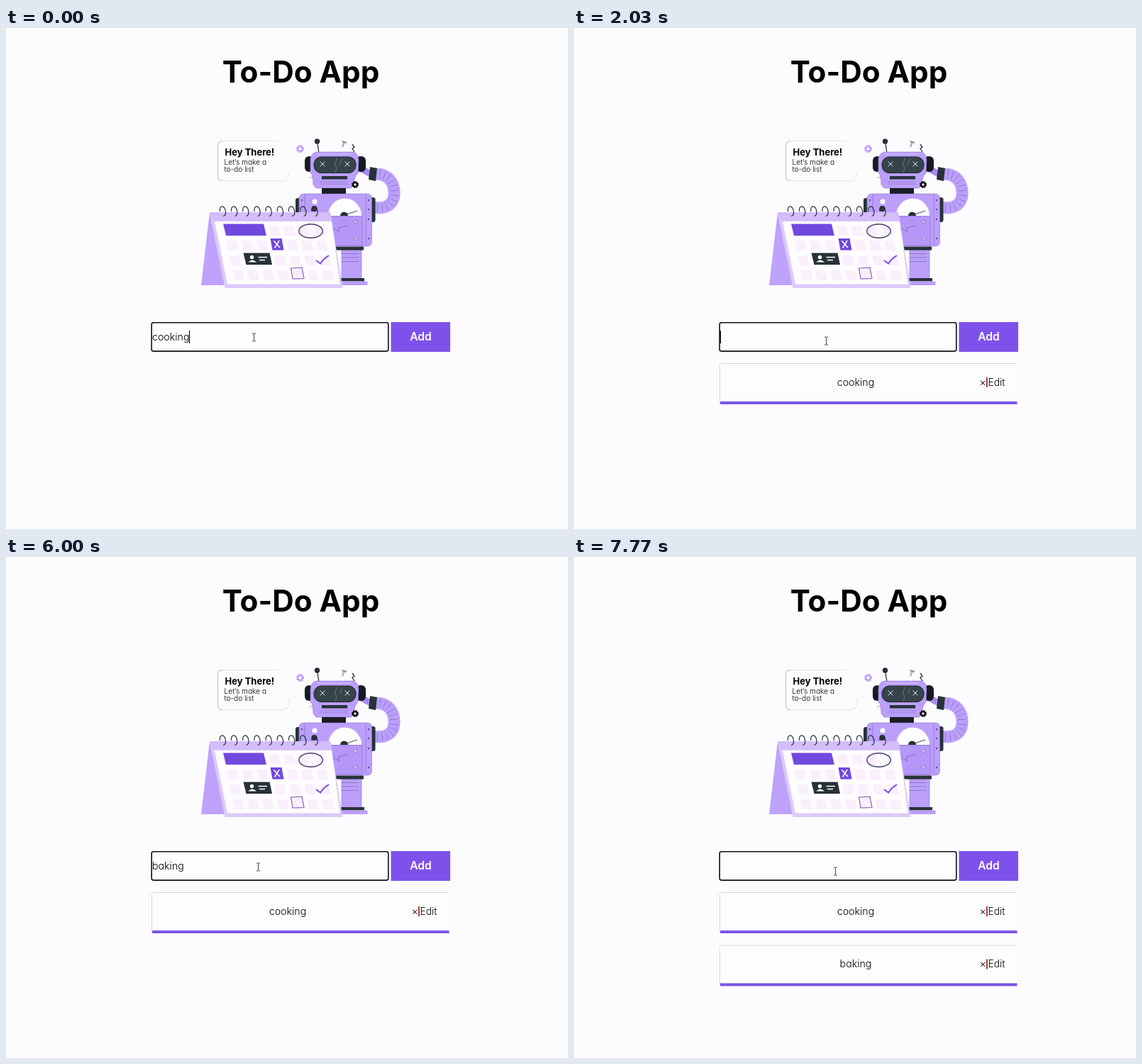
Write an HTML page that moves like this. It is 792 px wide and 707 px high and loops after 8000 ms.

```html
<!DOCTYPE html>
<html lang="en">
<head>
<meta charset="utf-8">
<title>To-Do App</title>
<style>
  html, body { margin: 0; width: 792px; height: 707px; overflow: hidden; background: #fcfcff; }
  svg { display: block; }
  text { font-family: Inter, "Open Sans", sans-serif; font-size: 14.2px; font-weight: 300; font-feature-settings: "cv11"; white-space: pre; }
  .bold { font-weight: 700; }
  .mid { text-anchor: middle; }
  .line { fill: none; stroke: #263238; }
  .lilac { fill: #bb9ffb; stroke: #8d74c9; stroke-width: .6; }
  .dark { fill: #263238; }
  .violet { fill: #7049de; }
</style>
</head>
<body>
<svg width="792" height="707" viewBox="0 0 792 707">
  <defs>
    <g id="item">
      <rect x="206" y="473" width="418" height="55" fill="#fdfdff"/>
      <path d="M205.500 528V476Q205.500 473.500 208 473.500H623" fill="none" stroke="#dcdcd2"/>
      <rect x="206" y="527" width="418.500" height="4" fill="#7a55e6"/>
      <text x="571.500" y="504.500">×</text>
      <rect x="581" y="493" width="1.800" height="14" fill="#a32a22"/>
      <text x="583.500" y="504.500" style="font-size:13.800px">Edit</text>
    </g>
    <path id="tube" d="M520 206C539 205 548 219 547 235C546 250 534 256 518 253"/>
  </defs>

  <text class="bold mid" x="415.500" y="76.500" style="font-size:42.200px">To-Do App</text>

  <!-- speech bubble -->
  <g fill="none" stroke="#e4e4e9">
    <path d="M384 159.500H305Q298.500 159.500 298.500 166V209Q298.500 215.500 305 215.500H391Q398 215.500 398 208V203"/>
    <path d="M398 203Q401 196.500 413 196" stroke="#efeff3"/>
    <path d="M305 159.500Q298.500 159.500 298.500 166V209Q298.500 215.500 305 215.500" stroke="#bdbdc2"/>
  </g>
  <text class="bold" x="308.500" y="180" style="font-size:13px">Hey There!</text>
  <text x="307.500" y="192.500" style="font-size:10.200px">Let’s make a</text>
  <text x="307.500" y="203" style="font-size:10.200px">to-do list</text>
  <g fill="none" stroke="#b999fa">
    <circle cx="414.500" cy="170.500" r="3.200" stroke-width="2"/>
    <circle cx="414.500" cy="170.500" r="4.800" stroke-width="1.800" stroke-dasharray="2 1.770"/>
  </g>

  <!-- robot: arm -->
  <path d="M501 199L514 206" stroke="#a98af0" stroke-width="9"/>
  <use href="#tube" fill="none" stroke="#bb9ffb" stroke-width="17"/>
  <use href="#tube" fill="none" stroke="#7c66b4" stroke-width="12" stroke-dasharray=".6 6"/>
  <path class="dark" d="M513 196L523 198L521 216L511 214Z"/>

  <!-- robot: head -->
  <path class="line" d="M439 163L441 177" stroke-width="1.300"/>
  <circle class="dark" cx="438.500" cy="160" r="3.700"/>
  <path d="M474 168L476.500 161" stroke="#b4b4ba" stroke-width="2.600"/>
  <path d="M473.500 160L480 162" stroke="#8f8f96" stroke-width="2"/>
  <path class="line" d="M488 164L491 168L488 170L491 175" stroke-width="1.300"/>
  <rect x="421" y="181" width="12" height="22" rx="6" fill="#151b20"/>
  <rect x="493" y="181" width="14" height="22" rx="6" fill="#151b20"/>
  <path class="lilac" d="M437 175H490Q496 177 497 186L496 205Q491 208 490 222L486 226H437L433 221Q433 208 429 204V185Q430 177 437 175Z"/>
  <path d="M438 178H486" stroke="#d9c8fd"/>
  <rect x="434" y="182" width="59" height="22.500" rx="10" fill="#37434a" stroke="#1d252a"/>
  <path d="M442.500 188.500L449.500 195.500M449.500 188.500L442.500 195.500M477.500 188.500L484.500 195.500M484.500 188.500L477.500 195.500" stroke="#dfe5e8"/>
  <path d="M467 183L463 192L466 197L464 204M474 184L470 193" fill="none" stroke="#7d8b92" stroke-width=".7"/>
  <rect class="dark" x="445" y="209" width="36" height="4.500"/>
  <path d="M443 217H482M443 220H482M427 212L432 210" stroke="#8d74c9" stroke-width=".7"/>
  <circle cx="492" cy="221" r="3" fill="none" stroke="#111" stroke-width="2.600"/>
  <circle cx="492" cy="221" r="4.400" fill="none" stroke="#111" stroke-width="1.400" stroke-dasharray="1.800 1.655"/>
  <rect x="445" y="226" width="34" height="8" fill="#171d22"/>

  <!-- robot: body and leg -->
  <rect class="dark" x="408" y="240" width="9" height="28" rx="3"/>
  <rect class="dark" x="512" y="239" width="8.500" height="35" rx="3"/>
  <rect class="lilac" x="413" y="234" width="102.500" height="74" rx="6"/>
  <path d="M421 235V262M507 235V306" stroke="#8d74c9" stroke-width=".7"/>
  <g fill="#5f4a99"><circle cx="417" cy="243" r="1.200"/><circle cx="511" cy="243" r="1.200"/><circle cx="511" cy="256" r="1.200"/><circle cx="511" cy="270" r="1.200"/><circle cx="511" cy="297" r="1.200"/></g>
  <circle cx="435" cy="245" r="3.600" fill="#fff"/>
  <circle class="dark" cx="434.500" cy="255" r="4"/>
  <path d="M454 265A23.500 24.500 0 0 1 501 265Z" fill="#fff"/>
  <path class="line" d="M477 264L495 258" stroke-width=".9"/>
  <path class="dark" d="M471 265A5.500 5.500 0 0 1 482 265Z"/>
  <path d="M456 265.500H502V307H462" fill="#b597f8" stroke="#8d74c9" stroke-width=".7"/>
  <path d="M458 281L470 288L468 282L481 279" fill="none" stroke="#7c66b4" stroke-width=".8"/>
  <g fill="#d6c5fb" stroke="#7c66b4" stroke-width=".7"><circle cx="492.500" cy="273.500" r="2.300"/><circle cx="492.500" cy="297" r="2.300"/></g>
  <rect class="lilac" x="473" y="313" width="28" height="41"/>
  <path d="M473 318.500H497M473 324H497M473 329.500H497" stroke="#7c66b4" stroke-width=".7"/>
  <rect class="dark" x="464" y="308.500" width="40" height="5"/>
  <rect class="dark" x="470" y="353" width="35" height="4.500"/>
  <path d="M470 357.500H509.500V363H470Z" fill="#bb9ffb"/>

  <!-- calendar -->
  <path d="M287 260L275 363H309Z" fill="#bfa2fb"/>
  <path d="M287 260H457L474.500 367H308.500Z" fill="#dccbfc"/>
  <path d="M287 260H457L459 272H291Z" fill="#d3bdfb"/>
  <path d="M294 273H459L470.500 361.500H312Z" fill="#fffdff"/>
  <g id="cells" fill="#faeffd"></g>
  <path class="violet" d="M306 276.500H363L367 293H310Z"/>
  <path class="violet" d="M372.500 297H388.500L391.500 313.500H375.500Z"/>
  <path d="M377.500 300.500L386 310M385 300L378.500 310.500" stroke="#fff" stroke-width="1.500"/>
  <path class="dark" d="M334.500 317.500H371.500L375 334H338.500Z"/>
  <g fill="#fff"><circle cx="346.500" cy="323.500" r="2.700"/><path d="M341.500 330.500Q347 324.500 353 330.500Z"/></g>
  <path d="M355.500 323.500H368M357 327.500H365" stroke="#fff" stroke-width="1.600"/>
  <path d="M437 328L443 332.500Q447 326 455 321" fill="none" stroke="#7049de" stroke-width="2"/>
  <path d="M401.500 339L417 338L420 353.500L404 354Z" fill="#fbeefb" stroke="#6f55b8" stroke-width="1.100"/>
  <ellipse cx="429.500" cy="286.500" rx="16.700" ry="9.800" fill="none" stroke="#443d70" stroke-width="1.400"/>
  <g id="rings" class="line" stroke-width="1.200"></g>

  <!-- form -->
  <rect id="idle" x="205" y="415.500" width="333.500" height="40.500" fill="none" stroke="#efeede" stroke-dasharray="4 2"/>
  <rect id="focus" x="205.200" y="415.800" width="333.600" height="40.300" rx="2.500" fill="#fdfdff" stroke="#101014" stroke-width="1.600"/>
  <text id="typed" x="206" y="440.500"></text>
  <rect id="caret" y="427" width="1" height="18"/>
  <rect id="add" x="542.500" y="415" width="83.500" height="42"/>
  <text class="mid" x="584.500" y="440.500" fill="#fff" style="font-size:15.600px;font-weight:600">Add</text>

  <g id="row1"><use href="#item"/><text class="mid" x="397" y="504.500">cooking</text></g>
  <g id="row2" transform="translate(0 74.500)"><use href="#item"/><text class="mid" x="397" y="504.500">baking</text></g>

  <path id="beam" fill="none" stroke="#45454a" d="M-2.500 -5.500H-.5L0 -5L.5 -5.500H2.500M0 -5V5M-2.500 5.500H-.5L0 5L.5 5.500H2.500"/>
  <path id="arrow" stroke="#fff" stroke-width=".8" d="M0 0V12.500L2.900 9.900L5 14.600L7 13.700L4.900 9.100H8.900Z"/>
</svg>
<script>
const $ = id => document.getElementById(id);
const LOOP = 8000, BLINK = 500;

// [time, input text]; null means the input has no focus
const typing = [
  [0, 'cooking'], [950, null], [1950, ''], [2970, 'b'], [3170, 'ba'], [3330, 'bal'], [4430, 'ba'],
  [5000, 'bak'], [5170, 'baki'], [5330, 'bakin'], [5470, 'baking'], [6690, null], [7270, '']
];
// [time, x, y] of the pointer
const route = [
  [0, 350, 437], [30, 350, 437], [620, 590, 440], [950, 590, 440], [1300, 597, 439], [1400, 597, 439],
  [1900, 361, 443], [2030, 356, 442], [2450, 356, 442], [2600, 356, 438], [6000, 356, 438],
  [6530, 581, 427], [6650, 586, 432], [6850, 586, 432], [7250, 372, 446], [7600, 372, 446], [7760, 369, 444]
];
const hovers = [[450, 1530], [6387, 6965]];

const clamp = v => Math.max(0, Math.min(1, v));
const show = (id, on) => $(id).setAttribute('visibility', on ? 'visible' : 'hidden');
const lastAt = (list, t) => list.findLastIndex(k => k[0] <= t);

function pointer(t) {
  const i = lastAt(route, t), a = route[i], b = route[i + 1] || a;
  const p = b === a ? 0 : (t - a[0]) / (b[0] - a[0]);
  const e = p * p * (3 - 2 * p);
  return [a[1] + (b[1] - a[1]) * e, a[2] + (b[2] - a[2]) * e];
}

function hover(t) {
  return Math.max(...hovers.map(([on, off]) => Math.min(clamp((t - on) / 140), 1 - clamp((t - off) / 140))));
}

function drawCalendar() {
  let cells = '', rings = '';
  for (let r = 0; r < 4; r++)
    for (let c = 0; c < 7; c++)
      cells += `<path d="M${307 + 4 * r + 21 * c} ${279 + 21 * r}h14l3 14h-14z"/>`;
  for (let i = 0; i < 9; i++)
    rings += `<path transform="translate(${16.2 * i})" d="M301.5 259C300 250 308 249 309.500 259Q310 265 306 265.500"/>`;
  $('cells').innerHTML = cells;
  $('rings').innerHTML = rings;
}

function draw(t) {
  const [since, text] = typing[lastAt(typing, t)];
  const focused = text !== null;
  $('typed').textContent = text || '';
  show('idle', !focused);
  show('focus', focused);
  show('caret', focused && Math.floor((t - since) / BLINK) % 2 === 0);
  $('caret').setAttribute('x', text ? Math.round(206 + $('typed').getComputedTextLength()) : 206);

  const h = hover(t), mix = (a, b) => Math.round(a + (b - a) * h);
  $('add').setAttribute('fill', `rgb(${mix(126, 197)},${mix(82, 188)},${mix(234, 226)})`);

  show('row1', t >= 950);
  show('row2', t >= 6690);

  const [x, y] = pointer(t).map(Math.round);
  const overInput = x < 539 && y > 415 && y < 457;
  show('beam', overInput);
  show('arrow', !overInput);
  $('beam').setAttribute('transform', `translate(${x - .5} ${y - .5})`);
  $('arrow').setAttribute('transform', `translate(${x} ${y})`);
}

function tick() {
  draw(performance.now() % LOOP);
  requestAnimationFrame(tick);
}

drawCalendar();
tick();
</script>
</body>
</html>
```
